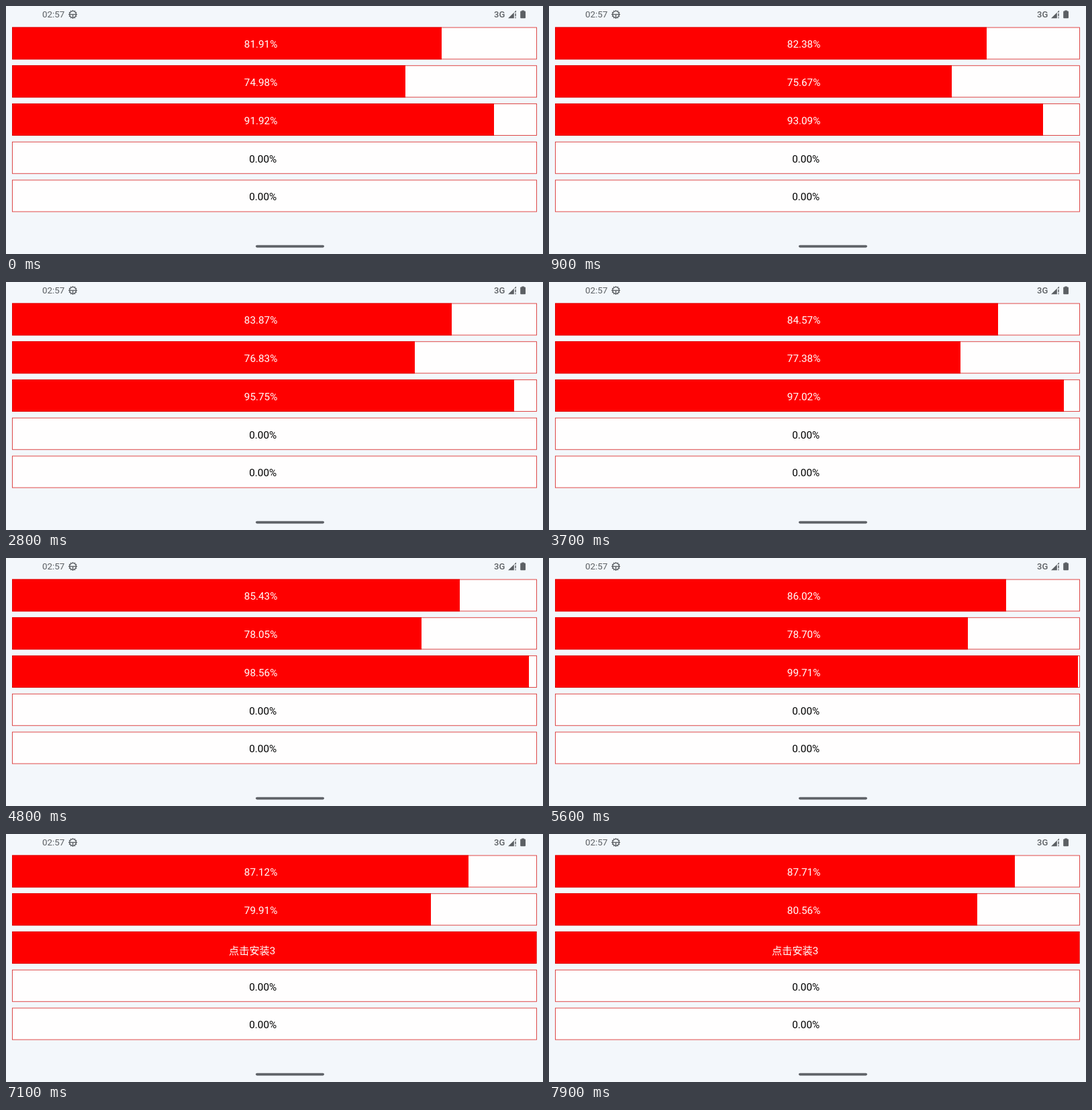
Animation of 800x369 px, one loop 8000 ms. Source, as an HTML page with a canvas:

```html
<!DOCTYPE html>
<html lang="zh">
<head>
<meta charset="utf-8">
<title>Download progress</title>
<style>
  html, body { margin: 0; width: 100%; height: 100%; overflow: hidden; background: #f3f7fb; }
  canvas { display: block; width: 800px; height: 369px; }
</style>
</head>
<body>
<canvas id="stage" width="800" height="369"></canvas>
<script>
const ctx = document.getElementById('stage').getContext('2d');

const LOOP = 8000, TICK = 100, ROWS = 5;
const LEFT = 9, TOP = 31.5, PITCH = 56.75, WIDTH = 782, HEIGHT = 48;
const RED = '#fe0000', EDGE = 'rgba(208, 0, 0, 0.8)', GREY = '#5c6064';
const FONT = 'Roboto, "Noto Sans CJK SC", "Noto Sans CJK", sans-serif';

// Percent reached by each running download at a few points in time
const TIMES = [0, 900, 4800, 7900];
const DOWNLOADS = [
  [81.91, 82.38, 85.43, 87.71],
  [74.98, 75.67, 78.05, 80.56],
  [91.92, 93.09, 98.56, 103]
];

function progress(points, t) {
  if (!points) return 0;
  const next = TIMES.findIndex((time, i) => i && t <= time);
  const i = next - 1;
  const k = (t - TIMES[i]) / (TIMES[next] - TIMES[i]);
  return Math.min(100, points[i] + (points[next] - points[i]) * k);
}

function text(str, x, y, size, color, weight = 400) {
  ctx.font = `${weight} ${size}px ${FONT}`;
  ctx.fillStyle = color;
  ctx.fillText(str, x, y);
}

function polygon(points) {
  ctx.beginPath();
  points.forEach(([x, y]) => ctx.lineTo(x, y));
  ctx.closePath();
  ctx.fill();
}

function pill(x, y, w, h, r) {
  ctx.beginPath();
  ctx.roundRect(x, y, w, h, r);
  ctx.fill();
}

function gear(x, y) {
  ctx.save();
  ctx.translate(x, y);
  ctx.strokeStyle = GREY;
  ctx.lineWidth = 1.4;
  ctx.beginPath();
  ctx.arc(0, 0, 4.9, 0, Math.PI * 2);
  ctx.stroke();
  const spoke = (angle, from, to) => {
    ctx.beginPath();
    ctx.moveTo(Math.cos(angle) * from, Math.sin(angle) * from);
    ctx.lineTo(Math.cos(angle) * to, Math.sin(angle) * to);
    ctx.stroke();
  };
  for (let i = 0; i < 12; i++) spoke(i * Math.PI / 6, 5, 6.5);
  for (let i = 0; i < 3; i++) spoke(i * Math.PI / 2, 0, 5);
  ctx.restore();
}

function statusBar() {
  text('02:57', 53.9, 17.4, 13.4, GREY);
  gear(99.6, 12.5);
  text('3G', 727, 17.2, 13, GREY, 500);
  ctx.fillStyle = GREY;
  polygon([[748, 18.2], [760, 6.5], [760, 9.5], [756.8, 9.5], [756.8, 18.2]]);
  ctx.fillRect(758.3, 11, 1.5, 4.4);
  ctx.fillRect(758.3, 16.7, 1.5, 1.5);
  ctx.fillRect(768.4, 6.5, 3.4, 2);
  pill(766.2, 7.6, 7.8, 10.7, 1);
}

function bar(index, t) {
  const y = TOP + PITCH * index;
  const value = progress(DOWNLOADS[index], t);

  ctx.fillStyle = '#fffefe';
  ctx.fillRect(LEFT, y, WIDTH, HEIGHT);
  ctx.fillStyle = RED;
  ctx.fillRect(LEFT, y, Math.round((WIDTH - 1) * value / 100), HEIGHT);
  ctx.strokeStyle = EDGE;
  ctx.lineWidth = 0.9;
  ctx.strokeRect(LEFT + 0.5, y + 0.5, WIDTH - 1, HEIGHT - 1);

  const base = y + 30.9;
  if (value === 100) text('点击安装' + (index + 1), 332, base + 3.4, 15.2, '#fff');
  else if (value > 0) text(value.toFixed(2) + '%', 354.8, base, 15.3, '#fff');
  else text('0.00%', 362.2, base, 15.3, '#000');
}

function draw(now) {
  const t = Math.floor(now % LOOP / TICK) * TICK;
  ctx.fillStyle = '#f3f7fb';
  ctx.fillRect(0, 0, 800, 369);
  statusBar();
  for (let i = 0; i < ROWS; i++) bar(i, t);
  ctx.fillStyle = '#5f6368';
  pill(372, 355.8, 102, 3.6, 1.8);
}

const start = performance.now();
function frame() {
  draw(performance.now() - start);
  requestAnimationFrame(frame);
}
frame();
</script>
</body>
</html>
```
